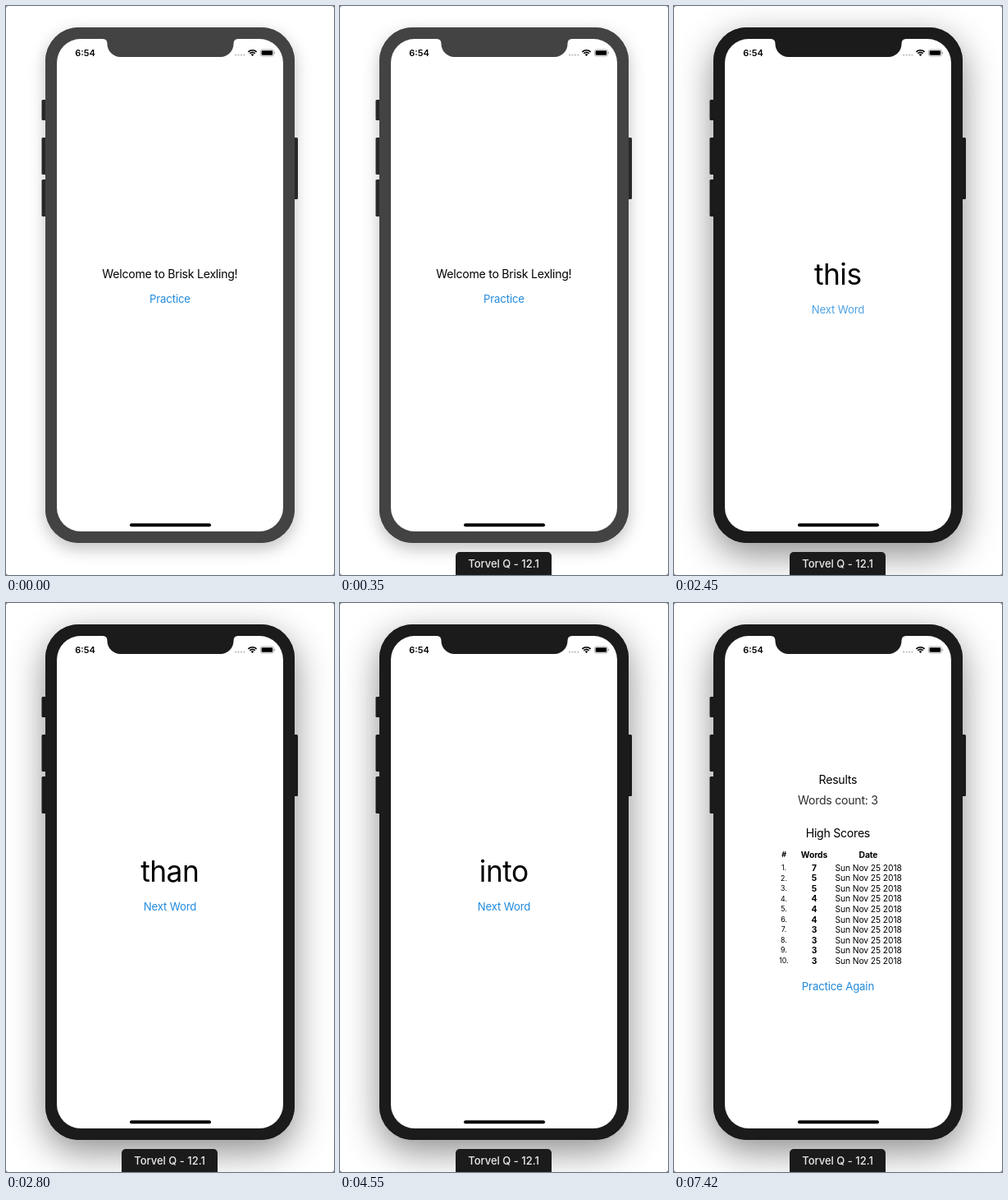
An HTML page with a canvas for the animation above (8 s loop, 400x692 px).

```html
<!DOCTYPE html>
<html lang="en">
<head>
<meta charset="utf-8">
<title>Speed reading app</title>
<style>
  html, body { margin: 0; width: 100%; height: 100%; overflow: hidden; background: #fff; }
  canvas { display: block; width: 400px; height: 692px; }
</style>
</head>
<body>
<canvas id="stage"></canvas>
<script>
const W = 400, H = 692, LOOP = 8000, STEP = 70;
const LABEL_AT = 350, FOCUS_AT = 1470, WORDS_AT = 1540, RESULTS_AT = 6860;
const BLUE = '#2089dc';
const FONT = 'Inter, "Open Sans", sans-serif';

const words = ['this', 'than', 'like', 'into'];
const taps = [
  { down: 2410, up: 2550 },
  { down: 3320, up: 3390 },
  { down: 4090, up: 4300 }
];
const scores = [7, 5, 5, 4, 4, 4, 3, 3, 3, 3];

const canvas = document.getElementById('stage');
const ctx = canvas.getContext('2d');
const dpr = window.devicePixelRatio || 1;
canvas.width = W * dpr;
canvas.height = H * dpr;

const clamp = x => Math.min(1, Math.max(0, x));
const ease = x => x < 0.5 ? 2 * x * x : 1 - 2 * (1 - x) * (1 - x);

function box(x, y, w, h, r, fill) {
  ctx.fillStyle = fill;
  ctx.beginPath();
  ctx.roundRect(x, y, w, h, r);
  ctx.fill();
}

function text(str, x, y, size, { color = '#000', weight = 400, spacing = 0 } = {}) {
  ctx.font = `${weight} ${size}px ${FONT}`;
  ctx.letterSpacing = spacing + 'px';
  ctx.textAlign = 'center';
  ctx.textBaseline = 'alphabetic';
  ctx.fillStyle = color;
  ctx.fillText(str, x + spacing / 2, y);
}

const heading = (str, y, color) => text(str, 200, y, 14.1, { color, spacing: -0.25 });
const link = (str, y) => text(str, 200, y, 13.2, { color: BLUE, spacing: -0.15 });

// Button opacity: dims while held, then recovers after release
function buttonAlpha(t) {
  const tap = taps.filter(p => t >= p.down).pop();
  if (!tap) return 1;
  const held = 1 - 0.8 * ease(clamp((Math.min(t, tap.up) - tap.down) / 110));
  return held + (1 - held) * ease(clamp((t - tap.up) / 250));
}

function drawBody(focused) {
  const color = focused ? '#1b1b1b' : '#434343';
  const side = focused ? '#1a1a1a' : '#28282a';

  ctx.save();
  ctx.shadowColor = focused ? 'rgba(0,0,0,.45)' : 'rgba(0,0,0,.25)';
  ctx.shadowBlur = (focused ? 44 : 20) * dpr;
  ctx.shadowOffsetY = (focused ? 14 : 7) * dpr;
  box(48, 26, 304, 627, 41, color);
  ctx.restore();

  for (const [y, h] of [[114, 25], [160, 45], [211, 45]]) box(43.5, y, 5, h, [1.5, 0, 0, 1.5], side);
  box(351.5, 160, 4.5, 75, [0, 1.5, 1.5, 0], side);
  box(48, 26, 304, 627, 41, color);
  box(62, 40, 276, 599, 29, '#fff');

  // notch
  ctx.fillStyle = color;
  ctx.beginPath();
  ctx.moveTo(118, 39.5);
  ctx.lineTo(118, 40);
  ctx.quadraticCurveTo(123.5, 40, 123.5, 46);
  ctx.arcTo(123.5, 62, 140, 62, 16);
  ctx.lineTo(261, 62);
  ctx.arcTo(277.5, 62, 277.5, 46, 16);
  ctx.quadraticCurveTo(277.5, 40, 283, 40);
  ctx.lineTo(283, 39.5);
  ctx.fill();
}

function drawStatus() {
  text('6:54', 96.5, 61, 11, { weight: 600 });
  for (let i = 0; i < 4; i++) box(279 + i * 3.4, 58.5, 2.2, 2.2, 1.1, '#bcbcbc');

  // wireless fan
  ctx.strokeStyle = '#000';
  ctx.lineWidth = 1.6;
  for (const r of [7.2, 4.6]) {
    ctx.beginPath();
    ctx.arc(300.5, 61, r, -Math.PI * 0.75, -Math.PI * 0.25);
    ctx.stroke();
  }
  ctx.fillStyle = '#000';
  ctx.beginPath();
  ctx.moveTo(300.5, 61);
  ctx.arc(300.5, 61, 2.7, -Math.PI * 0.75, -Math.PI * 0.25);
  ctx.fill();

  // battery
  ctx.strokeStyle = '#a0a0a0';
  ctx.lineWidth = 0.8;
  ctx.beginPath();
  ctx.roundRect(310.4, 53, 16, 8, 2.2);
  ctx.stroke();
  box(311.6, 54.2, 13.6, 5.6, 1.2, '#000');
  box(327.2, 55.7, 1, 2.6, [0, 1, 1, 0], '#a0a0a0');

  box(151, 629.3, 99, 4, 2, '#000');
}

function drawWelcome() {
  heading('Welcome to Brisk Lexling!', 331);
  link('Practice', 360.5);
}

function drawWord(t) {
  const index = taps.filter(p => t >= p.up).length;
  text(words[index], 200, 339.3, 35.3, { spacing: -0.5 });
  ctx.globalAlpha = buttonAlpha(t);
  link('Next Word', 373.7);
  ctx.globalAlpha = 1;
}

function drawResults() {
  heading('Results', 220);
  heading('Words count: 3', 245, '#2c2c2c');
  heading('High Scores', 285);

  const bold = { weight: 700, spacing: -0.1 };
  text('#', 134, 308.5, 8.8, bold);
  text('Words', 171, 309.7, 10.3, bold);
  text('Date', 237, 309.7, 10.3, bold);
  scores.forEach((n, i) => {
    const y = 325.8 + i * 12.55;
    text(i + 1 + '.', 134, y - 0.8, 8.8);
    text(n, 171, y, 10.3, bold);
    text('Sun Nov 25 2018', 237.2, y, 10.3, { spacing: -0.1 });
  });
  link('Practice Again', 471);
}

function drawLabel() {
  box(141, 664, 117, 34, 5, '#1b1b1c');
  text('Torvel Q - 12.1', 199.5, 683.4, 13, { color: '#ececec', weight: 500 });
}

function draw(t) {
  ctx.setTransform(dpr, 0, 0, dpr, 0, 0);
  box(0, 0, W, H, 0, '#707070');
  box(0, 0, W, H, 3, '#fff');
  drawBody(t >= FOCUS_AT);
  drawStatus();
  if (t < WORDS_AT) drawWelcome();
  else if (t < RESULTS_AT) drawWord(t);
  else drawResults();
  if (t >= LABEL_AT) drawLabel();
}

const start = performance.now();
function tick() {
  const t = (performance.now() - start) % LOOP;
  draw(Math.floor(t / STEP) * STEP);
  requestAnimationFrame(tick);
}
tick();
</script>
</body>
</html>
```
